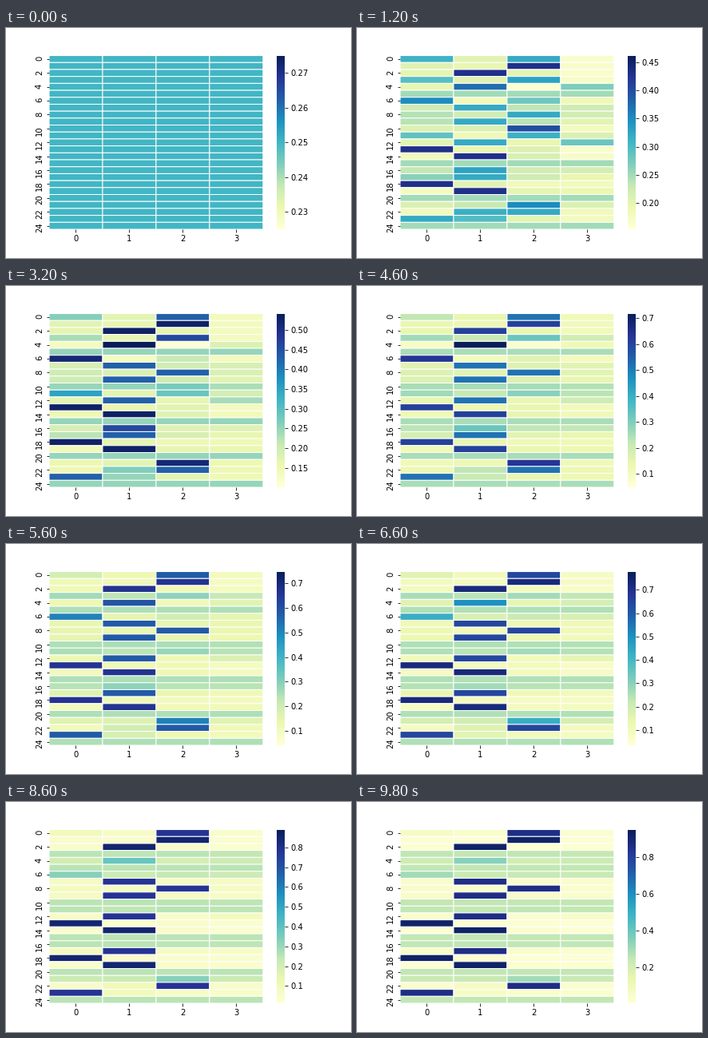
Write a matplotlib script that moves like this. It is 432x288 px and loops after 10 s.

```python
import numpy as np
import matplotlib.pyplot as plt
from matplotlib.animation import FuncAnimation

FRAMES, STEP = 50, 200
ROWS, COLS = 25, 4
WARMUP = 6

# colour range over time
KEYS = [0, 6, 16, 23, 33, 38, 49]
LOW = [0.25, 0.153, 0.1003, 0.049, 0.035, 0.021, 0.004]
HIGH = [0.25, 0.462, 0.5415, 0.717, 0.778, 0.839, 0.950]

# rows that settle on one column, and those among them that do so early
SETTLED = {0: (13, 18, 23), 1: (2, 7, 9, 12, 14, 17, 19), 2: (0, 1, 8, 22)}
EARLY = {1, 2, 13, 14, 18, 19}
# rows that peak and fade again: column, frame and height of the peak
FADING = {3: (2, 16, 0.46), 4: (1, 23, 0.717), 6: (0, 23, 0.63),
          10: (2, 6, 0.40), 11: (0, 16, 0.35), 16: (1, 16, 0.46),
          21: (2, 23, 0.63)}
# second-best column of a row
RUNNER_UP = {0: 0, 3: 0, 4: 3, 6: 2, 11: 2, 12: 3, 22: 1, 23: 1}

rng = np.random.default_rng(4)
weights = rng.uniform(0.88, 1.15, (ROWS, COLS)) * [1, 1, 1, 0.92]
for row, col in RUNNER_UP.items():
    weights[row, col] = 1.55


def rise(row, frame):
    start, end = (0.43, 0.92) if row in EARLY else (0.32, 0.86)
    if frame < WARMUP:
        return 0.25 + (start - 0.25) * frame / WARMUP
    progress = (frame - WARMUP) / (FRAMES - 1 - WARMUP)
    return start + (end - start) * progress ** 1.1


def hump(frame, when, top):
    """Linear climb to the top, then a decay that is slower for high tops."""
    gain = top - 0.25
    if frame <= when:
        return 0.25 + gain * frame / when
    return 0.25 + gain * np.exp((when - frame) / (34 * gain))


def fill(row, lead, peak, contrast):
    """One row: the peak, and the remainder shared by the other columns."""
    share = weights[row] ** contrast
    share[lead] = 0
    values = (1 - peak) * share / share.sum()
    values[lead] = peak
    return values


def policy(frame):
    grid = np.full((ROWS, COLS), 0.25)
    contrast = min(frame / WARMUP, 1)
    for lead, rows in SETTLED.items():
        for row in rows:
            grid[row] = fill(row, lead, rise(row, frame), contrast)
    for row, (lead, when, top) in FADING.items():
        fade = min(1, np.exp((when - frame) / 12))
        grid[row] = fill(row, lead, hump(frame, when, top), contrast * fade)
    return grid


def limits(frame):
    if frame == 0:
        return 0.225, 0.275
    return np.interp(frame, KEYS, LOW), np.interp(frame, KEYS, HIGH)


plt.rcParams.update({"font.family": "DejaVu Sans", "font.size": 10})
fig = plt.figure(figsize=(6, 4), dpi=72, facecolor="white")
fig.subplots_adjust(left=0.125, right=0.9, bottom=0.125, top=0.88)
ax = fig.add_subplot()
mesh = ax.pcolormesh(policy(0), cmap="YlGnBu", vmin=0.225, vmax=0.275,
                     edgecolors="white", linewidths=1, antialiased=True,
                     snap=False)
ax.set(xlim=(0, COLS), ylim=(ROWS, 0))
ax.spines[:].set_visible(False)
ax.set_xticks(np.arange(COLS) + 0.5, range(COLS))
ax.set_yticks(np.arange(0, ROWS, 2) + 0.5, range(0, ROWS, 2), rotation=90)
bar = fig.colorbar(mesh, ax=ax)
bar.outline.set_linewidth(0)


def draw(frame):
    mesh.set_array(policy(frame))
    mesh.set_clim(*limits(frame))
    return [mesh]


anim = FuncAnimation(fig, draw, frames=FRAMES, interval=STEP,
                     init_func=lambda: draw(0), repeat=True, repeat_delay=0)
plt.show()
```
